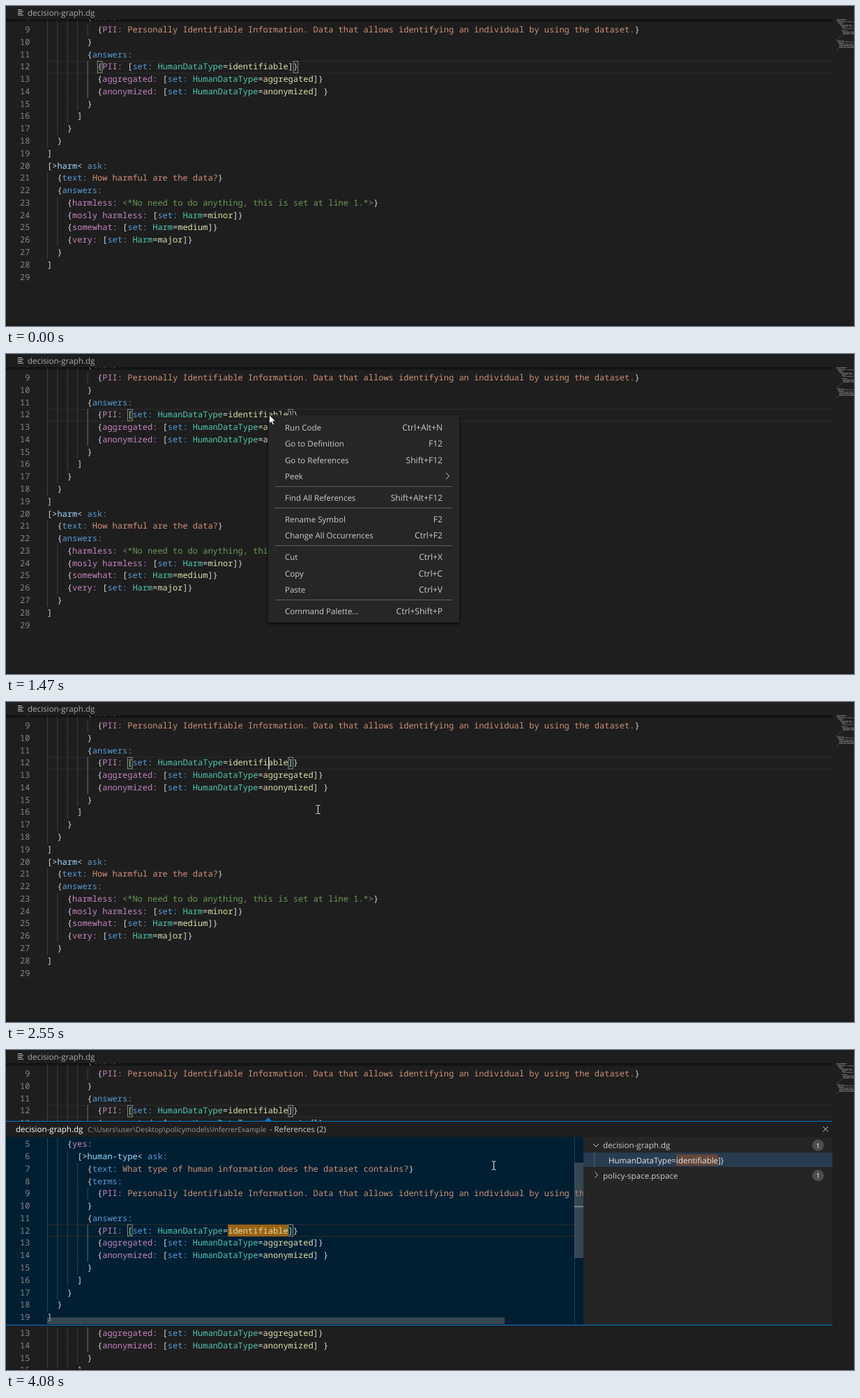
Write an HTML page that moves like this. It is 1216 by 460 pixels and loops after 4400 ms.

```html
<!DOCTYPE html>
<html lang="en">
<head>
<meta charset="utf-8">
<title>Go to References</title>
<style>
html, body { margin: 0; width: 100%; height: 100%; overflow: hidden; background: #1e1e1e; }
#stage { display: block; width: 100vw; height: 100vh; }
text { font: 11.6px "Open Sans", "Noto Sans", sans-serif; fill: #ccc; white-space: pre; text-rendering: geometricPrecision; }
.code { font: 12px "Noto Sans Mono", "Liberation Mono", monospace; fill: #d4d4d4; }
.num { fill: #858585; text-anchor: end; }
.comment { fill: #6a9955; }
.string { fill: #ce9178; }
.key { fill: #569cd6; }
.name { fill: #c586c0; }
.slot { fill: #4ec9b0; }
.value { fill: #dcdcaa; }
.label { fill: #9cdcfe; }
.end { text-anchor: end; }
.line { fill: none; stroke: #ccc; }
.guide { fill: none; stroke: #404040; }
.box { fill: #006400; fill-opacity: .1; stroke: #888; }
.current { fill: none; stroke: #2c2c2c; }
</style>
</head>
<body>
<svg id="stage" viewBox="0 0 1216 460" preserveAspectRatio="none"></svg>
<script>
const LOOP = 4400, LINE = 17.775, CHAR = 7.2, LEFT = 59;

const source = `[set: Harm=none]
[>human< ask:
  {text: Does the dataset contain human data?}
  {answers:
    {yes:
      [>human-type< ask:
        {text: What type of human information does the dataset contains?}
        {terms:
          {PII: Personally Identifiable Information. Data that allows identifying an individual by using the dataset.}
        }
        {answers:
          {PII: [set: HumanDataType=identifiable]}
          {aggregated: [set: HumanDataType=aggregated]}
          {anonymized: [set: HumanDataType=anonymized] }
        }
      ]
    }
  }
]
[>harm< ask:
  {text: How harmful are the data?}
  {answers:
    {harmless: <*No need to do anything, this is set at line 1.*>}
    {mosly harmless: [set: Harm=minor]}
    {somewhat: [set: Harm=medium]}
    {very: [set: Harm=major]}
  }
]
`.split("\n");

const grammar = new RegExp([
  "(?<comment><\\*.*\\*>)",
  "(?<string>(?<=: )[A-Z][^=\\]]*(?=\\}$))",
  "(?<key>\\b(?:ask|set|text|terms|answers):)",
  "(?<name>(?<=\\{)[\\w ]+:)",
  "(?<slot>\\w+(?==))",
  "(?<value>(?<==)\\w+)",
  "(?<label>(?<=>)[\\w-]+(?=<))"
].join("|"), "g");

const escape = s => s.replace(/&/g, "&amp;").replace(/</g, "&lt;").replace(/>/g, "&gt;");
const indentOf = s => s.length - s.trimStart().length;
const colX = col => LEFT + col * CHAR;
const rect = (x, y, w, h, fill, more = "") =>
  `<rect x="${x}" y="${y}" width="${w}" height="${h}" fill="${fill}" ${more}/>`;
const text = (x, y, s, more = "") => `<text x="${x}" y="${y}" ${more}>${escape(s)}</text>`;
const stroke = (d, more = "") => `<path class="line" d="${d}" ${more}/>`;
const view = (x, y, w, h, body) =>
  `<svg x="${x}" y="${y}" width="${w}" height="${h}" viewBox="${x} ${y} ${w} ${h}">${body}</svg>`;

function highlight(s) {
  const span = (at, part, cls) => part.trim()
    ? `<tspan x="${colX(at + indentOf(part)).toFixed(1)}" class="${cls}">${escape(part.trim())}</tspan>` : "";
  let out = "", at = 0;
  for (const m of s.matchAll(grammar)) {
    const cls = Object.keys(m.groups).find(k => m.groups[k]);
    out += span(at, s.slice(at, m.index), "") + span(m.index, m[0], cls);
    at = m.index + m[0].length;
  }
  return out + span(at, s.slice(at), "");
}

// Code lines first..last with numbers and indent guides; y is the first baseline.
function listing(first, last, y) {
  let guides = "", active = "", body = "";
  for (let n = first; n <= last; n++, y += LINE) {
    const s = source[n - 1];
    for (let col = 0; col < indentOf(s); col += 2) {
      const d = `M${colX(col) + .5} ${y - 12.5}v${LINE}`;
      if (col === 8 && n >= 12 && n <= 14) active += d; else guides += d;
    }
    body += text(34.5, y, String(n), 'class="code num"') +
      `<text class="code" y="${y}">${highlight(s)}</text>`;
  }
  return `<path class="guide" d="${guides}"/><path class="guide" style="stroke:#707070" d="${active}"/>` + body;
}

const brackets = (a, b, y) => [a, b].map(col =>
  `<rect class="box" x="${colX(col) + .3}" y="${y + .5}" width="6.6" height="16.5"/>`).join("");
const currentLine = (y, right) =>
  `<path class="current" d="M${LEFT} ${y + .5}H${right}M${LEFT} ${y + 17.5}H${right}"/>`;

function minimap() {
  let d = "";
  source.forEach((s, i) => {
    for (const m of s.matchAll(/\S+/g))
      d += `M${1191 + m.index * .9} ${19.5 + i * 1.6}h${m[0].length * .9}`;
  });
  return view(1186, 19, 30, 441, `<path d="${d}" stroke="#8c8c8c" stroke-opacity=".7" fill="none"/>`);
}

function header() {
  return rect(0, 0, 1216, 19, "#1e1e1e") + rect(0, 19, 1185, 5, "url(#shade)") +
    stroke("M17 5.5h6M17 8h8M17 10.5h6M17 13h8", 'stroke-width="1.1"') +
    text(31, 14, "decision-graph.dg", 'style="fill:#a9a9a9"');
}

const menuItems = [
  ["Run Code", "Ctrl+Alt+N", 105.5], ["Go to Definition", "F12", 129],
  ["Go to References", "Shift+F12", 152.5], ["Peek", "", 176],
  ["Find All References", "Shift+Alt+F12", 207],
  ["Rename Symbol", "F2", 237.5], ["Change All Occurrences", "Ctrl+F2", 261],
  ["Cut", "Ctrl+X", 292], ["Copy", "Ctrl+C", 315.5], ["Paste", "Ctrl+V", 339],
  ["Command Palette...", "Ctrl+Shift+P", 370]
];

function menu() {
  return rect(376, 88, 274, 298, "#252526", 'filter="url(#drop)"') +
    rect(376, 0, 274, 22, "#094771", 'id="hover"') +
    [190.5, 221.5, 275.5, 353.5].map(y => stroke(`M386 ${y}H640`, 'style="stroke:#606060"')).join("") +
    menuItems.map(([name, keys, y]) => text(400, y + 4, name, 'style="font-size:11.5px"') +
      text(626, y + 4, keys, 'class="end" style="font-size:12.1px"')).join("") +
    stroke("M631 171l4.5 4.5l-4.5 4.5");
}

function tree() {
  const badge = y => `<circle cx="1164.5" cy="${y}" r="8.3" fill="#4d4d4d"/>` +
    text(1164.5, y + 3.5, "1", 'text-anchor="middle" style="font-size:9.5px;fill:#fff"');
  return rect(828, 125, 357, 270, "#252526") + rect(828, 147.5, 357, 20.5, "#283c51") +
    rect(961, 150, 60, 16.5, "#624639") +
    stroke("M843.5 147.5v20.5", 'style="stroke:#585858"') +
    stroke("M842 135l4 4l4-4M844.5 175.5l4 4l-4 4") +
    text(856, 141, "decision-graph.dg") + text(856, 184.5, "policy-space.pspace") +
    text(864, 163, "HumanDataType=", 'style="font-size:11.5px;fill:#e6e6e6"') +
    text(961, 163, "identifiable]}", 'style="font-size:11.5px;fill:#e6e6e6"') +
    badge(137) + badge(180.5);
}

function peek() {
  const editor = rect(0, 125, 828, 270, "#001f33") + currentLine(250.5, 815) +
    rect(colX(36), 251, 12 * CHAR, 17, "#996214") +
    listing(5, 19, 139.2) + brackets(16, 48, 250.5) +
    stroke("M815.5 125V395", 'style="stroke:#7f7f7f;stroke-opacity:.3"') +
    `<g id="bars">${rect(815, 162, 13, 137, "#797979", 'opacity=".45"')}` +
    `${rect(59, 384.5, 656, 9.5, "#797979", 'opacity=".45"')}</g>` +
    rect(815, 224.5, 13, 1.2, "#a0a0a0");
  return `<path d="M370.5 102.5l5.5-5.5l5.5 5.5z" fill="#007acc"/>` +
    rect(0, 102, 1185, 23, "#1e1e1e") + view(0, 125, 828, 270, editor) + tree() +
    text(14, 118, "decision-graph.dg", 'style="fill:#fff"') +
    text(117, 118, "C:\\Users\\user\\Desktop\\policymodels\\InferrerExample", 'style="font-size:10.25px;fill:#999"') +
    text(378, 118, "- References (2)", 'style="font-size:11.3px"') +
    stroke("M1171.5 110l7.5 7.5M1179 110l-7.5 7.5") +
    rect(0, 396, 1185, 64, "#1e1e1e") + view(0, 396, 1185, 64, listing(13, 16, 411)) +
    stroke("M0 102.5H1185M0 395.5H1185", 'style="stroke:#007acc"');
}

document.getElementById("stage").innerHTML = `
<defs>
  <linearGradient id="shade" x2="0" y2="1"><stop stop-opacity=".6"/><stop offset="1" stop-opacity="0"/></linearGradient>
  <filter id="drop" x="-5%" y="-5%" width="110%" height="110%"><feDropShadow dx="0" dy="2" stdDeviation="2.2" flood-opacity=".8"/></filter>
</defs>
${rect(0, 0, 1216, 460, "#1e1e1e")}
${currentLine(79, 1185)}
${view(0, 17, 1185, 443, listing(8, 29, 38 - LINE))}
${header()}${minimap()}
<g id="outer">${brackets(10, 49, 79)}</g>
<g id="inner">${brackets(16, 48, 79)}</g>
${rect(376, 79, 1.5, 17.5, "#d0d0d0", 'id="caret"')}
<g id="peek">${peek()}</g>
${rect(0, 458.5, 1216, 1.5, "#191919")}
<g id="menu">${menu()}</g>
<path id="beam" class="line" style="stroke:#eee" d="M-3-6H-.8L0-5.2L.8-6H3M0-5.5V5.5M-3 6H-.8L0 5.2L.8 6H3"/>
<path id="arrow" d="M0 0V12.6L2.9 9.9L4.8 14.2L6.9 13.3L5 9.2H9Z" fill="#fff" stroke="#000" stroke-width=".7"/>`;

const part = Object.fromEntries(["outer", "inner", "caret", "peek", "bars", "menu", "hover", "beam", "arrow"]
  .map(id => [id, document.getElementById(id)]));
const show = (name, on) => part[name].setAttribute("display", on ? "inline" : "none");
const within = (t, a, b) => t >= a && t < b;

// Pointer moves: first step, last step, number of steps, x, y
const moves = [
  [70, 70, 1, 1016, 404], [150, 460, 5, 358.5, 96], [540, 540, 1, 372.5, 94.5],
  [620, 770, 3, 378.5, 87.5], [1470, 1470, 1, 377.5, 87.5], [1620, 1850, 4, 451, 161],
  [2080, 2080, 1, 449.8, 157.8], [2170, 2170, 1, 446.5, 156.5],
  [2400, 2400, 1, 447.5, 154.5], [3860, 4080, 4, 699.5, 166]
];

function pointer(t) {
  let x = 1016, y = 404;
  for (const [first, last, n, toX, toY] of moves) {
    if (t < first) break;
    const gap = n > 1 ? (last - first) / (n - 1) : 1;
    const p = Math.min(n, Math.floor((t - first + 4) / gap) + 1) / n;
    const ease = p * (2 - p);
    x += (toX - x) * ease;
    y += (toY - y) * ease;
  }
  return [x, y];
}

function draw(t) {
  const [x, y] = pointer(t);
  const isArrow = within(t, 1470, 2400);
  show("arrow", isArrow);
  show("beam", t >= 70 && !isArrow);
  part[isArrow ? "arrow" : "beam"].setAttribute("transform", `translate(${x} ${y})`);

  show("outer", t < 1230);
  show("inner", t >= 1230);
  show("caret", within(t, 2470, 2700));

  show("menu", within(t, 1310, 2320));
  part.menu.setAttribute("opacity", t < 1390 ? .5 : 1);
  show("hover", t >= 1620);
  const row = Math.max(0, Math.min(3, Math.floor((y - 94) / 23.5)));
  part.hover.setAttribute("y", 94 + row * 23.5);

  show("peek", t >= 2700);
  part.bars.setAttribute("opacity", t < 2780 ? .45 : 1);
}

function tick() {
  draw(performance.now() % LOOP);
  requestAnimationFrame(tick);
}
tick();
</script>
</body>
</html>
```
